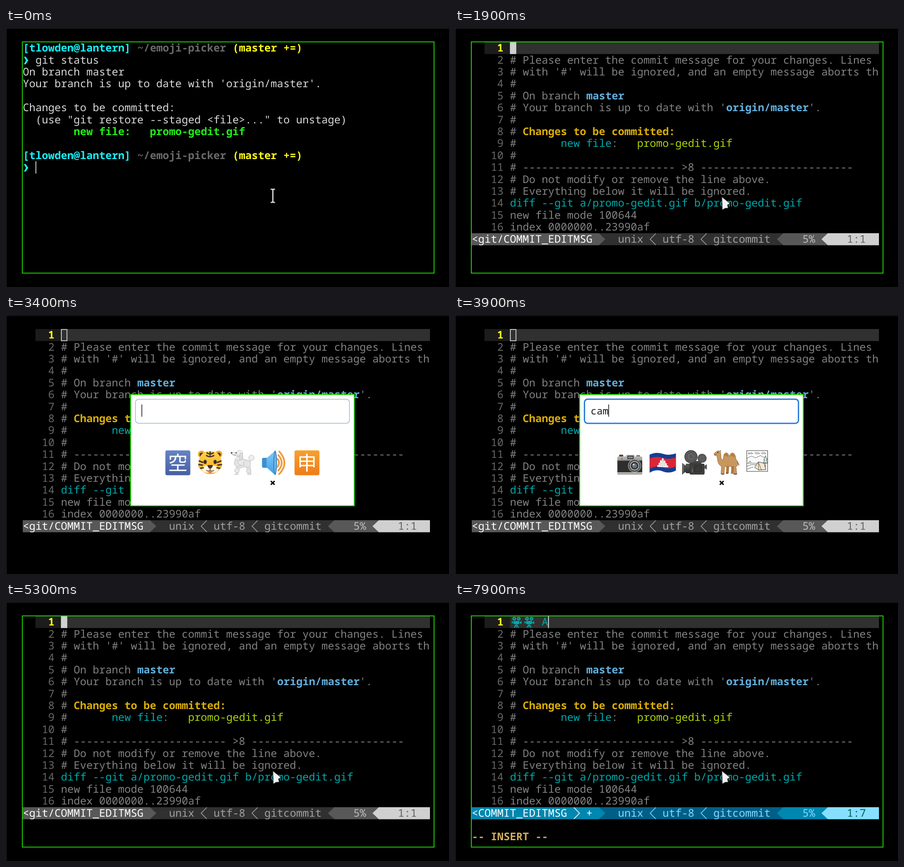
Animation, 977 px wide and 573 px high, one loop 8 s. Source, as an HTML page:

```html
<!DOCTYPE html>
<html lang="en">
<head>
<meta charset="utf-8">
<title>Emoji commit</title>
<style>
html, body { margin: 0; width: 100%; height: 100%; overflow: hidden; background: #000; }
svg { display: block; width: 977px; height: 573px; }
text { font: 23.37px "Noto Sans Mono", "DejaVu Sans Mono", monospace; white-space: pre; text-rendering: geometricPrecision; }
.b { font-weight: 700; }
.query { font-size: 21.83px; }
.cjk { font: 500 43px "Noto Sans CJK JP", "Noto Sans CJK", sans-serif; }
</style>
</head>
<body>
<svg id="stage" viewBox="0 0 977 573" xml:space="preserve"></svg>
<script>
const LOOP = 8000, X0 = 37, Y0 = 31, CW = 14.022, CH = 26.4;
const stage = document.getElementById('stage');
const colX = c => X0 + c * CW;
const rowY = r => Y0 + r * CH;
const count = (times, t) => times.filter(x => x <= t).length;

// Small markup helpers
const esc = s => s.replace(/&/g, '&amp;').replace(/</g, '&lt;');
const text = (r, c, s, fill, bold) =>
  `<text x="${colX(c)}" y="${rowY(r) + 21.2}" fill="${fill}"${bold ? ' class="b"' : ''}>${esc(s)}</text>`;
const rect = (x, y, w, h, fill, more = '') =>
  `<rect x="${x}" y="${y}" width="${w}" height="${h}" fill="${fill}" ${more}/>`;
const disc = (x, y, r, fill, more = '') => `<circle cx="${x}" cy="${y}" r="${r}" fill="${fill}" ${more}/>`;
const oval = (x, y, rx, ry, fill) => `<ellipse cx="${x}" cy="${y}" rx="${rx}" ry="${ry}" fill="${fill}"/>`;
const path = (d, fill, more = '') => `<path d="${d}" fill="${fill}" ${more}/>`;
const line = (d, color, w, more = '') => path(d, 'none', `stroke="${color}" stroke-width="${w}" ${more}`);
const round = 'stroke-linecap="round" stroke-linejoin="round"';
const grad = (id, a, b) => `<linearGradient id="${id}" x2="0" y2="1"><stop stop-color="${a}"/><stop offset="1" stop-color="${b}"/></linearGradient>`;

const defs = '<defs>' + grad('blue', '#6584c4', '#465fa3') + grad('orange', '#f7a02c', '#ee7d1b') +
  grad('sky', '#83cbfa', '#3e9ee6') + grad('silver', '#c9c9c4', '#8f8f8b') +
  grad('dark', '#5d5d5d', '#292929') + grad('fur', '#ffd34c', '#f5ab20') + '</defs>';

// Emoji, each about 55 units square
const button = (ch, fill) => rect(0.5, 0.5, 55, 55, fill, 'rx="4"') +
  `<text class="cjk" x="28" y="43.5" text-anchor="middle" fill="#fff">${ch}</text>`;

const reel = (x, y, r) => disc(x, y, r, '#3c3c3c') + disc(x, y, r * .88, '#666') +
  disc(x, y, r * .78, '#555') + disc(x, y, r * .5, '#6e6e6e') + disc(x, y, r * .38, '#585858');

function burst(x, y, rx, ry, n) {
  const p = [];
  for (let i = 0; i < n * 2; i++) {
    const a = i * Math.PI / n - Math.PI / 2, k = i % 2 ? .62 : 1;
    p.push(`${(x + Math.cos(a) * rx * k).toFixed(1)} ${(y + Math.sin(a) * ry * k).toFixed(1)}`);
  }
  return path('M' + p.join('L') + 'Z', '#ffe52b', 'stroke="#e8522a" stroke-width="1.4"');
}

const camera = rect(4, 10, 9, 6, '#4a4a4a', 'rx="1"') + rect(42, 11, 8, 5, '#777', 'rx="1"') +
  path('M0 16Q0 14 2 14H18L20 10H37L39 14H53Q55 14 55 16V25H0Z', 'url(#silver)') +
  rect(22, 12, 14, 8, '#444', 'rx="1"') + rect(24, 14, 10, 4, '#7c8890') +
  rect(0, 23, 55, 27, '#383838') + rect(2, 25, 51, 23, '#2e2e2e') +
  path('M0 49H55V52Q55 54 53 54H2Q0 54 0 52Z', 'url(#silver)') + disc(10, 19, 1.6, '#d64132') +
  disc(38, 34.5, 14.5, '#9c9c9c') + disc(38, 34.5, 13, '#4a4a4a') + disc(38, 34.5, 10.5, '#b4b4b4') +
  disc(38, 34.5, 8.5, '#333') + disc(38, 34.5, 5.5, '#66727b') + disc(36, 32, 2, '#cfdbe3');

const art = {
  sky: button('空', 'url(#blue)'),
  apply: button('申', 'url(#orange)'),
  tiger: disc(9, 9, 8, '#f4ad25') + disc(47, 9, 8, '#f4ad25') + disc(9, 10, 4.5, '#4b3735') + disc(47, 10, 4.5, '#4b3735') +
    path('M28 2C45 2 52 13 53 27C56 35 53 40 48 43C43 50 36 53 28 53S13 50 8 43C3 40 0 35 3 27C4 13 11 2 28 2Z', 'url(#fur)') +
    oval(20, 42, 10, 8, '#fff5dc') + oval(36, 42, 10, 8, '#fff5dc') +
    line('M28 4V11M21 6Q28 11 35 6M20 12Q28 17 36 12M4 24L12 27M52 24L44 27M3 32L11 33M53 32L45 33M7 40L13 39M49 40L43 39', '#44312f', 3, round) +
    oval(17, 26, 3.5, 4.5, '#3b2b2b') + oval(39, 26, 3.5, 4.5, '#3b2b2b') +
    path('M22 33H34Q33 40 28 41Q23 40 22 33Z', '#443231') + line('M28 40V44M20 45Q25 48 28 44Q31 48 36 45', '#6b4b35', 1.7, round) +
    path('M24 47Q28 45 32 47Q31 51 28 51T24 47Z', '#e87564'),
  poodle: `<g stroke="#bdbdbd" stroke-width="1">` +
    path('M16 27L15 51L10 54H18L21 40L36 36L41 47L39 54H47L45 36L38 25Z', '#e6e6e6') +
    line('M41 28L47 20', '#d4d4d4', 3) + path('M20 5L5 5Q2 8 6 10L19 14Z', '#ececec') +
    disc(21, 23, 9.5, '#ededed') + disc(18, 29, 8, '#e3e3e3') + oval(29, 27, 11, 7, '#e9e9e9') +
    disc(38, 30, 8, '#e5e5e5') + disc(48, 17, 6, '#eee') + disc(16, 45, 5, '#eaeaea') + disc(42, 46, 5, '#e4e4e4') +
    disc(22, 7, 6.5, '#f1f1f1') + oval(25, 14, 4, 8, '#dcdcdc') + '</g>' +
    disc(4, 6, 1.8, '#3b3b3b') + disc(14, 6, 1.2, '#333') + line('M6 10L14 11', '#888', 1),
  speaker: rect(0, 17, 13, 22, '#3c8fd0', 'rx="3"') + path('M10 18L29 1V55L10 38Z', 'url(#sky)') +
    oval(29, 28, 4, 27, '#2e7fc2') + oval(29, 28, 2, 23, '#72bdf0') +
    line('M34 19Q41 28 34 37M36 11Q51 28 36 45M38 3Q61 28 38 53', '#ee9b40', 3.8, round),
  camera,
  flash: camera + burst(33, 10, 17, 12.5, 12),
  movie: path('M17 24H43V32H17Z', '#444') + reel(20, 14.5, 14.4) + reel(44.5, 18, 10) +
    path('M.5 28L8 34L9 30H18V51H9L8 48L.5 54Z', 'url(#dark)') + rect(1.5, 31, 3, 20, '#666') +
    rect(17, 30, 33, 24, '#353535', 'rx="3"') + rect(19, 32, 29, 20, '#414141', 'rx="2"') +
    rect(27, 34, 17, 15, '#222', 'rx="2"') + rect(28, 35, 15, 13, '#3a3a3a', 'rx="1"') +
    path('M50 35L55 31V43L50 40Z', '#4b4b4b') + disc(23, 42, 1.3, '#e43a2e') + disc(23, 46, 1.3, '#43b54a'),
  flag: path('M0 10Q14 3 29 8T58 7V45Q43 53 29 47T0 50Z', '#173c91') +
    path('M0 19Q14 12 29 17T58 16V36Q43 43 29 38T0 41Z', '#dc2636') +
    path('M17 37V33H20V28H23V24L25 21L27 25V20L29 17L31 20V25L33 22L35 25V29H38V34H41V38Z', '#fff') +
    line('M20 33H38M23 29H35M26 25H32M25 28V36M29 22V37M33 28V36', '#c9a5ac', .8),
  camel: path('M4 4Q9 -1 14 4L15 13Q15 22 20 21Q20 7 26 6Q31 5 33 14Q36 6 41 6Q47 8 48 20Q54 26 51 35L48 36L50 53H43L41 38L35 36L23 37L22 53H15L16 36Q8 32 7 19L6 12L1 12Q-1 9 0 7Z',
    '#c7975f', 'stroke="#a77443" stroke-width="1"') +
    path('M27 35L26 51H32L33 36ZM38 35L37 52H42L44 36Z', '#a97748') +
    path('M21 12Q24 4 29 8L32 15ZM36 12Q39 4 44 9L46 16Z', '#b37e4a') +
    line('M51 25L55 34', '#8f613b', 1.7) + disc(8, 5, 1.2, '#2c211a') + line('M1 10L5 9', '#754e31', 1) +
    path('M12 2L14 -1L15 4Z', '#a77443') + line('M16 53H22M43 53H50M26 51H31', '#604533', 2.2),
  camping: rect(.7, 1, 46, 46, '#fff', 'stroke="#333" stroke-width="1"') +
    path('M1 18L11 13L20 17L31 12L47 20V29H1Z', '#f8fafa', 'stroke="#444" stroke-width=".8"') +
    line('M3 8Q5 4 8 7Q11 3 14 8H4M18 7Q20 3 23 6Q27 3 29 8H19M32 7Q35 3 37 6Q40 3 43 8H33', '#555', .9) +
    path('M37 28L40 22L38 22L42 12L46 22L44 22L47 28Z', '#cfe5db', 'stroke="#333" stroke-width=".8"') +
    path('M18 38L26 26L39 29L43 43L27 44Z', '#f6e6ca', 'stroke="#333" stroke-width="1"') +
    line('M26 26L27 44M26 26L33 44M1 36Q10 30 22 33M2 42L15 37M42 28V38M4 29L8 24L10 28', '#444', .9),
  camcorder: rect(6, 9, 44, 11, '#5fb2ec', 'rx="3"') + rect(13, 12, 37, 40, 'url(#sky)', 'rx="3"') +
    path('M0 11L12 15V31L0 36Z', '#7cc4f4') + rect(2, 15, 4, 17, '#5aa8e2') +
    path('M50 20L55 18V37L50 34Z', '#5aabe6') + rect(17, 25, 27, 22, '#4197da', 'rx="2"') +
    rect(19, 27, 23, 18, '#86cdfa', 'rx="1"') + disc(19, 19, 2.2, '#eaf6ff') + rect(30, 16, 15, 4, '#4b9fdf', 'rx="2"'),
  selfie: path('M0 34Q13 37 23 40L38 27L48 35L33 54Q31 56 27 56H0Z', 'url(#sky)') +
    line('M3 51L28 49L42 34', '#3487cd', 1.1) +
    path('M37 29L42 22L37 17Q35 12 40 13L47 18L50 10Q55 9 54 16L53 30L46 36Z', '#fbc735', 'stroke="#e0a126" stroke-width="1"') +
    rect(39, 0, 13, 24, '#4a99d8', 'rx="2" transform="rotate(5 45 12)"') +
    rect(41, 3, 9, 16, '#dff1fc', 'transform="rotate(5 45 12)"') +
    line('M39 17L45 18M39 22L46 23M42 27L48 26', '#f5b928', 4, round)
};

const RANDOM = ['sky', 'tiger', 'poodle', 'speaker', 'apply'];
const CAM = ['camera', 'flag', 'movie', 'camel', 'camping'];
const CAMERA = ['camera', 'movie', 'flash', 'camcorder', 'selfie'];

function emojiRow(names, x, picked) {
  return names.map((name, i) => {
    const big = i === picked, k = big ? 1.667 : 1;
    const g = `<g transform="translate(${x} ${big ? 281 : 299}) scale(${k})">${art[name]}</g>`;
    x += big ? 111.5 : 71.2;
    return g;
  }).join('');
}

function shell(t) {
  const head = r => text(r, 0, '[tlowden@lantern]', '#18f0fa', 1) + text(r, 18, '~/emoji-picker', '#6a6a6a', 1) +
    text(r, 33, '(master +=)', '#fffb18', 1) + path(`M39.5 ${rowY(r + 1) + 6}h4l5.6 8.4-5.6 8.4h-4l4.5-8.4z`, '#18f0fa');
  const typed = 'git commit'.slice(0, count([300, 400, 500, 600, 700, 800, 900, 1100, 1200, 1300], t));
  const out = ['git status', 'On branch master', "Your branch is up to date with 'origin/master'.", '',
    'Changes to be committed:', '  (use "git restore --staged <file>..." to unstage)'];
  return head(0) + out.map((s, i) => text(i + 1, i ? 0 : 2, s, '#dadada')).join('') +
    text(7, 8, 'new file:   promo-gedit.gif', '#20ef18', 1) + head(9) +
    text(10, 2, typed, '#dadada') + rect(colX(2 + typed.length), rowY(10), 1.7, 27, '#e0e0e0');
}

const GREY = '#828282', TEAL = '#00a9ab', SKY = '#62afdc';
const REMOTE = 'origin/master';

// Grey lines first, with gaps where the coloured words go
const vimText = [
  '', '# Please enter the commit message for your changes. Lines',
  "# with '#' will be ignored, and an empty message aborts th", '#', '# On branch',
  `# Your branch is up to date with '${' '.repeat(REMOTE.length)}'.`, '#', '#', '#               :', '#',
  `# ${'-'.repeat(24)} >8 ${'-'.repeat(24)}`, '# Do not modify or remove the line above.',
  '# Everything below it will be ignored.', '', 'new file mode 100644', 'index 0000000..23990af'
].map((s, i) => text(i, 6, s, GREY) +
  text(i, 3, String(i + 1).padStart(2), i ? '#686868' : '#ffff18', !i)).join('') +
  text(4, 18, 'master', SKY, 1) + text(5, 40, REMOTE, SKY, 1) +
  text(7, 8, 'Changes to be committed:', '#d9ae08', 1) + text(8, 14, 'new file', TEAL) +
  text(8, 26, 'promo-gedit.gif', '#add60c') + text(13, 6, 'diff --git a/promo-gedit.gif b/promo-gedit.gif', TEAL);

const PLAIN = { a: '#585858', b: '#303030', d: '#d0d0d0', soft: '#a0a0a0', pct: '#bcbcbc', pos: '#606060' };
const INSERT = { a: '#0087af', b: '#005f87', d: '#87dfff', soft: '#87d7ff', pct: '#87d7ff', pos: '#005f5f' };

function statusBar(p, dirty, pos) {
  const y = 454, h = 26.5, mid = y + h / 2, end = y + h;
  const thin = (c, dir, color) => {
    const l = colX(c) + .8, r = colX(c + 1) - .8, [from, tip] = dir > 0 ? [l, r] : [r, l];
    return line(`M${from} ${y + .5}L${tip} ${mid}L${from} ${end - .5}`, color, 1.6);
  };
  const a = colX(20), c = colX(49), d = colX(56);
  return rect(X0, y, 898, h, p.b) + path(`M${X0} ${y}H${a}L${a + CW} ${mid}L${a} ${end}H${X0}Z`, p.a) +
    path(`M935 ${y}H${c}L${c - CW} ${mid}L${c} ${end}H935Z`, p.a) +
    path(`M935 ${y}H${d}L${d - CW} ${mid}L${d} ${end}H935Z`, p.d) +
    text(16, 0, dirty ? '<COMMIT_EDITMSG   +' : '<git/COMMIT_EDITMSG', '#fff') +
    (dirty ? thin(16, 1, '#fff') : '') +
    text(16, 23, 'unix', p.soft) + thin(28, -1, p.soft) + text(16, 30, 'utf-8', p.soft) +
    thin(36, -1, p.soft) + text(16, 38, 'gitcommit', p.soft) +
    text(16, 52, '5%', p.pct) + text(16, 59, '1:' + pos, p.pos);
}

const projector = c => `<g transform="translate(${colX(c)} ${Y0})">` + disc(9.5, 6, 4, TEAL) + disc(19.5, 6, 4, TEAL) +
  disc(9.5, 6, 1.3, '#303030') + disc(19.5, 6, 1.3, '#303030') +
  path('M8 11H20.5V18H8ZM21.5 13.5L25.5 11V18L21.5 15.5ZM4 12H7V16H4ZM12 19H16.5L20 26H17.8L15 21V26H13.4V21L10.6 26H8.4Z', TEAL) + '</g>';

function vim(t, focused) {
  const insert = t >= 6100, emoji = count([6300, 6900], t), space = t >= 7100, a = t >= 7900;
  const cells = emoji * 2 + space + a, x = colX(6 + cells);
  const cursor = insert ? rect(x, Y0, 1.8, 26.6, '#e4e4e4')
    : focused ? rect(x, Y0, 14, 26.6, '#d0d0d0')
    : rect(x + 1, Y0 + 1, 12.3, 25, 'none', 'stroke="#d0d0d0" stroke-width="1.8"');
  return rect(colX(2), Y0, 4 * CW, 26.6, '#1c1c1c') + rect(colX(6), Y0, 935 - colX(6), 26.6, '#303030') + vimText +
    (emoji ? projector(6) : '') + (emoji > 1 ? projector(8) : '') + (a ? text(0, 11, 'A', TEAL) : '') + cursor +
    statusBar(insert ? INSERT : PLAIN, t >= 6400, cells + 1) + (insert ? text(18, 0, '-- INSERT --', '#d6ae5f', 1) : '');
}

function popup(t) {
  const frame = rect(275, 176, 493, 246, '#fff', 'stroke="#20ee00" stroke-width="2"');
  if (t < 3400) return frame;
  const query = t >= 4200 ? 'camera' : 'came'.slice(0, count([3700, 3800, 3900, 4100], t));
  const border = t < 3500 ? 'stroke="#a9bfcd" stroke-width="1.7"' : 'stroke="#2f7fdc" stroke-width="3"';
  const picked = count([4600, 4800], t) - 1;
  const row = t < 3800 ? emojiRow(RANDOM, 351) : t < 4100 ? emojiRow(CAM, 358) : emojiRow(CAMERA, picked < 0 ? 351.5 : 332, picked);
  return frame + rect(285.5, 186.3, 472, 53.4, '#fff', `rx="7" ${border}`) +
    `<text class="query" x="299.3" y="220" fill="#181818">${query}</text>` +
    rect(298.8 + query.length * 13.1, 198, 1.5, 27, '#111') + row;
}

function pointer(t, open) {
  if (open) {
    const d = 'M584 367.3L592.4 375.5M592.4 367.3L584 375.5';
    return line(d, '#fff', 6) + line(d, '#000', 3);
  }
  if (t < 1700) {
    const d = 'M584.5 356.8H587L588.5 358L590 356.8H592.5M588.5 358V384.5M584.5 385.7H587L588.5 384.5L590 385.7H592.5';
    return line(d, '#333', 4.4, round) + line(d, '#fff', 1.9);
  }
  return path('M588.5 373.5L606.5 388L601 391.5L602.5 398.5L595.5 399L589.5 402.5Z', '#f3f3f3',
    'stroke="#333" stroke-width="1.3" stroke-linejoin="round"');
}

function scene(t) {
  const open = t >= 3300 && t < 5300;
  const screen = t < 1700 ? shell(t) : t < 1900 ? rect(X0, Y0, 1.7, 26.5, '#e0e0e0') : vim(t, !open);
  return defs + rect(0, 0, 977, 573, '#000') + line('M0 .5H977M.5 0V573', '#2c2c2c', 1) + screen +
    (open ? popup(t) : rect(36, 30.7, 908, 511.6, 'none', 'stroke="#22dd08" stroke-width="1.8"')) + pointer(t, open);
}

let shown = '';
const start = performance.now();
function draw() {
  const markup = scene((performance.now() - start) % LOOP);
  if (markup !== shown) stage.innerHTML = shown = markup;
  requestAnimationFrame(draw);
}
draw();
</script>
</body>
</html>
```
